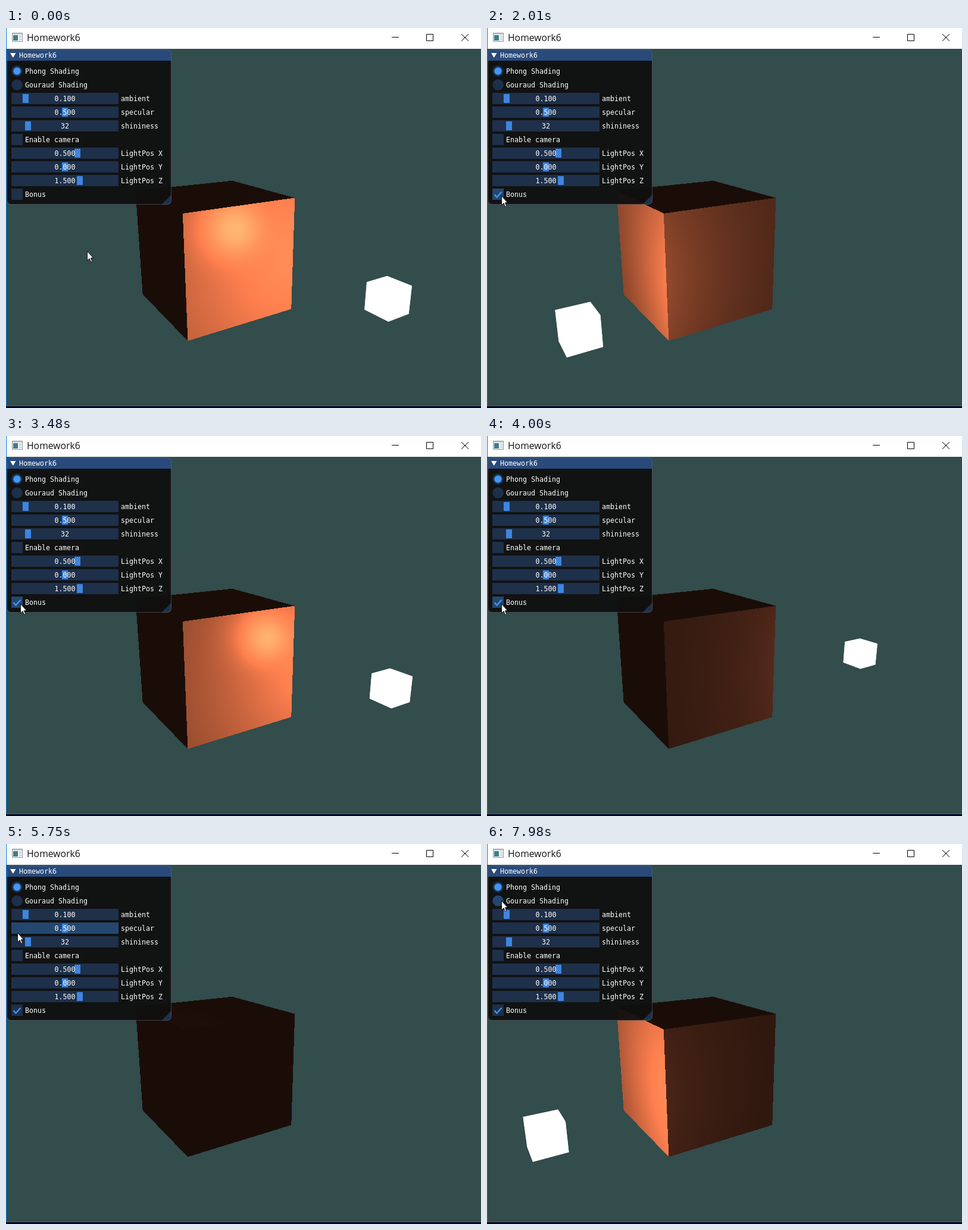
Animation of 798x639 px, one loop 8 s. Source, as an HTML page with a canvas:

```html
<!DOCTYPE html>
<html lang="en">
<head>
<meta charset="utf-8">
<title>Homework6</title>
<style>
  html, body { margin: 0; width: 100%; height: 100%; overflow: hidden; background: #000; }
  canvas, svg { position: absolute; left: 0; top: 0; }
  .mono { font: 11.65px "DejaVu Sans Mono", "Liberation Mono", monospace; fill: #fff; white-space: pre; }
  .title { font: 15.75px "Open Sans", "Noto Sans", sans-serif; fill: #111; }
  .frame { fill: rgba(41,74,122,.54); }
  .frame.hot { fill: rgba(66,150,250,.4); }
  .grab { fill: #3d85e0; }
</style>
</head>
<body>
<canvas id="scene" width="798" height="639"></canvas>
<svg id="ui" width="798" height="639" viewBox="0 0 798 639">
  <rect width="798" height="35" fill="#fff"/>
  <rect width="1" height="636" fill="#0078d7"/>
  <rect y="635" width="798" height="1" fill="#0078d7"/>
  <rect y="636" width="798" height="3" fill="#000"/>
  <g id="icon">
    <rect x="10.5" y="8.5" width="17" height="14" fill="#f4f6f7" stroke="#8b959b"/>
    <rect x="11" y="9" width="16" height="2" fill="#c3ccd1"/>
    <rect x="12" y="12" width="8" height="9" fill="#3f7d86"/>
    <path d="M22 13.5h4M22 16.5h4M22 19.5h4" stroke="#a5afb5"/>
  </g>
  <text class="title" x="35" y="22">Homework6</text>
  <path d="M648 15.5h12M706.5 10.5h11v11h-11zM765 10l12 12M777 10l-12 12" fill="none" stroke="#000"/>
  <g id="panel">
    <rect x="1.5" y="36.5" width="276" height="260" rx="7" fill="rgba(15,15,15,.94)"/>
    <path d="M1 55V43a7 7 0 0 1 7-7H271a7 7 0 0 1 7 7V55z" fill="#294a7a"/>
    <path d="M7 42h9.5l-4.75 8z" fill="#fff"/>
    <path d="M278 280v10a7 7 0 0 1-7 7h-10z" fill="rgba(66,150,250,.25)"/>
    <rect x="1.5" y="36.5" width="276" height="260" rx="7" fill="none" stroke="rgba(110,110,128,.5)"/>
    <text class="mono" x="22" y="50">Homework6</text>
  </g>
  <path id="check" d="M12.5 280l4 4.5 8-9" fill="none" stroke="#4296fa" stroke-width="2.3"/>
  <path id="mouse" d="M.5.5V16l3.6-3.4 2.4 5.9 2.3-1-2.4-5.7h4.4z" fill="#fff" stroke="#000" stroke-width=".9"/>
</svg>
<script>
const LOOP = 8000, BG = '#334c4c';
const COLOR = [255, 127.5, 79], AMBIENT = 0.1, SPECULAR = 0.5;
const $ = id => document.getElementById(id);

// ---------- settings panel ----------
const NS = 'http://www.w3.org/2000/svg';
const panel = $('panel');
function add(tag, attrs, text) {
  const el = document.createElementNS(NS, tag);
  for (const k in attrs) el.setAttribute(k, attrs[k]);
  if (text) el.textContent = text;
  return panel.appendChild(el);
}

// kind, label, value, grab x
const widgets = [
  ['radio', 'Phong Shading', true],
  ['radio', 'Gouraud Shading', false],
  ['slider', 'ambient', '0.100', 28],
  ['slider', 'specular', '0.500', 94],
  ['slider', 'shininess', '32', 32],
  ['check', 'Enable camera'],
  ['slider', 'LightPos X', '0.500', 115],
  ['slider', 'LightPos Y', '0.000', 94],
  ['slider', 'LightPos Z', '1.500', 119],
  ['check', 'Bonus']
];
const rows = widgets.map(([kind, label, value, grab], i) => {
  const y = 63 + 23 * i, slider = kind === 'slider';
  const frame = kind === 'radio'
    ? add('circle', { cx: 18.5, cy: y + 9.5, r: 9.3, class: 'frame' })
    : add('rect', { x: 9, y, width: slider ? 180 : 19, height: 19, class: 'frame' });
  if (slider) {
    add('rect', { x: grab, y: y + 2, width: 10, height: 15, class: 'grab' });
    add('text', { x: 99, y: y + 14, 'text-anchor': 'middle', class: 'mono' }, value);
  } else if (value) {
    add('circle', { cx: 18.5, cy: y + 9.5, r: 6.2, fill: '#4296fa' });
  }
  add('text', { x: slider ? 193 : 32, y: y + 14, class: 'mono' }, label);
  return { y, frame };
});

// ---------- camera ----------
const rad = Math.PI / 180;
const CX = 401, CY = 334.8, FOCAL = 300 / Math.tan(22.5 * rad);
const EYE = [-1.703, 1.222, 3.205];
const sy = Math.sin(32.4 * rad), cy = Math.cos(32.4 * rad);
const sp = Math.sin(15.66 * rad), cp = Math.cos(15.66 * rad);
const RIGHT = [cy, 0, sy];
const UP = [sy * sp, cp, -cy * sp];
const FWD = [sy * cp, -sp, -cy * cp];
const dot = (a, b) => a[0] * b[0] + a[1] * b[1] + a[2] * b[2];

function project(p) {
  const q = p.map((v, i) => v - EYE[i]), d = dot(q, FWD);
  return [CX + FOCAL * dot(q, RIGHT) / d, CY - FOCAL * dot(q, UP) / d];
}

// ---------- shaded cube ----------
const BOX = { x: 212, y: 250, w: 280, h: 282 };
const FACES = [[2, 0.5], [0, -0.5], [1, 0.5]];
const cube = document.createElement('canvas');
cube.width = BOX.w;
cube.height = BOX.h;
const cubeCtx = cube.getContext('2d');
const image = cubeCtx.createImageData(BOX.w, BOX.h);

// Surface point, view vector and face of every covered pixel
const hits = [];
for (let j = 0; j < BOX.h; j++) {
  for (let i = 0; i < BOX.w; i++) {
    const u = (BOX.x + i + 0.5 - CX) / FOCAL, v = (CY - BOX.y - j - 0.5) / FOCAL;
    const dir = FWD.map((f, k) => f + u * RIGHT[k] + v * UP[k]);
    for (const [axis, side] of FACES) {
      const t = (side - EYE[axis]) / dir[axis];
      const p = dir.map((d, k) => EYE[k] + d * t);
      if (t > 0 && p.every((c, k) => k === axis || Math.abs(c) <= 0.5)) {
        const len = Math.hypot(...dir);
        hits.push({ at: (j * BOX.w + i) * 4, p, view: dir.map(d => -d / len), axis, sign: Math.sign(side) });
        break;
      }
    }
  }
}

function shade(light) {
  const out = image.data;
  for (const { at, p, view, axis, sign } of hits) {
    const l = [light[0] - p[0], light[1] - p[1], light[2] - p[2]];
    const len = Math.sqrt(dot(l, l));
    const nl = sign * l[axis] / len;
    const rv = Math.max(0, 2 * nl * sign * view[axis] - dot(l, view) / len);
    const k = AMBIENT + Math.max(0, nl) + SPECULAR * Math.pow(rv, 32);
    for (let c = 0; c < 3; c++) out[at + c] = COLOR[c] * k;
    out[at + 3] = 255;
  }
  cubeCtx.putImageData(image, 0, 0);
}

// ---------- lamp ----------
const ctx = $('scene').getContext('2d');
function drawLamp(light) {
  ctx.fillStyle = '#fff';
  for (let axis = 0; axis < 3; axis++) {
    for (const side of [-0.1, 0.1]) {
      ctx.beginPath();
      for (const [a, b] of [[-1, -1], [1, -1], [1, 1], [-1, 1]]) {
        const p = light.slice();
        p[axis] += side;
        p[(axis + 1) % 3] += a * 0.1;
        p[(axis + 2) % 3] += b * 0.1;
        ctx.lineTo(...project(p));
      }
      ctx.fill();
    }
  }
}

function drawScene(light) {
  const behind = light[2] < 0;
  ctx.fillStyle = BG;
  ctx.fillRect(0, 0, 798, 639);
  shade(light);
  if (behind) drawLamp(light);
  ctx.drawImage(cube, BOX.x, BOX.y);
  if (!behind) drawLamp(light);
}

// ---------- timeline ----------
// start, end, number of updates
const RUNS = [
  [1320, 2090, 11], [2180, 2940, 11], [3020, 3780, 11], [3840, 4610, 11], [4670, 4980, 5],
  [5360, 5920, 8], [6060, 6800, 11], [6880, 7420, 8], [7570, 7980, 7]
];
const ticks = RUNS.flatMap(([a, b, n]) =>
  Array.from({ length: n }, (_, i) => a + (b - a) * i / (n - 1)));

// time, orbit angle in degrees
const ORBIT = [[1320, -93.7], [1551, -80.4], [2408, -31.5], [3476, 30.6], [3994, 62.4], [7980, 295.9]];

// time, x, y
const MOUSE = [
  [0, 136, 375], [70, 112, 358], [145, 82, 332], [220, 55, 310], [295, 36, 295], [370, 29, 290],
  [600, 27, 291], [670, 25, 290], [750, 28, 291], [1000, 26, 287], [1070, 25, 284], [1150, 24, 282],
  [5220, 24, 280], [5360, 24, 264], [5440, 23, 241], [5520, 22, 216], [5600, 21, 192],
  [5670, 20, 170], [5750, 19, 149], [5830, 19, 133], [5920, 19, 122],
  [6060, 20, 115], [6134, 21, 106], [6208, 23, 98], [6282, 24, 95]
];

const lastBefore = (list, t, key) => {
  let found = list[0];
  for (const item of list) if (key(item) <= t) found = item;
  return found;
};

function orbitAngle(t) {
  let i = 1;
  while (i < ORBIT.length - 1 && t > ORBIT[i][0]) i++;
  const [t0, a0] = ORBIT[i - 1], [t1, a1] = ORBIT[i];
  return a0 + (a1 - a0) * (t - t0) / (t1 - t0);
}

function lightAt(t) {
  if (t < ticks[0]) return [0.5, 0, 1.5];
  const a = orbitAngle(lastBefore(ticks, t + 10, x => x)) * rad;
  return [1.512 * Math.sin(a), 0, 1.512 * Math.cos(a)];
}

let shown = '';
function render(t) {
  const light = lightAt(t), key = light.join();
  if (key !== shown) {
    drawScene(light);
    shown = key;
  }
  const [, x, y] = lastBefore(MOUSE, t, m => m[0]);
  $('mouse').setAttribute('transform', `translate(${x} ${y})`);
  for (const row of rows) {
    row.frame.classList.toggle('hot', x >= 9 && x < 67 && y >= row.y && y < row.y + 19);
  }
  $('check').style.display = t < ticks[0] ? 'none' : '';
}

const start = performance.now();
function loop() {
  render((performance.now() - start) % LOOP);
  requestAnimationFrame(loop);
}
loop();
</script>
</body>
</html>
```
